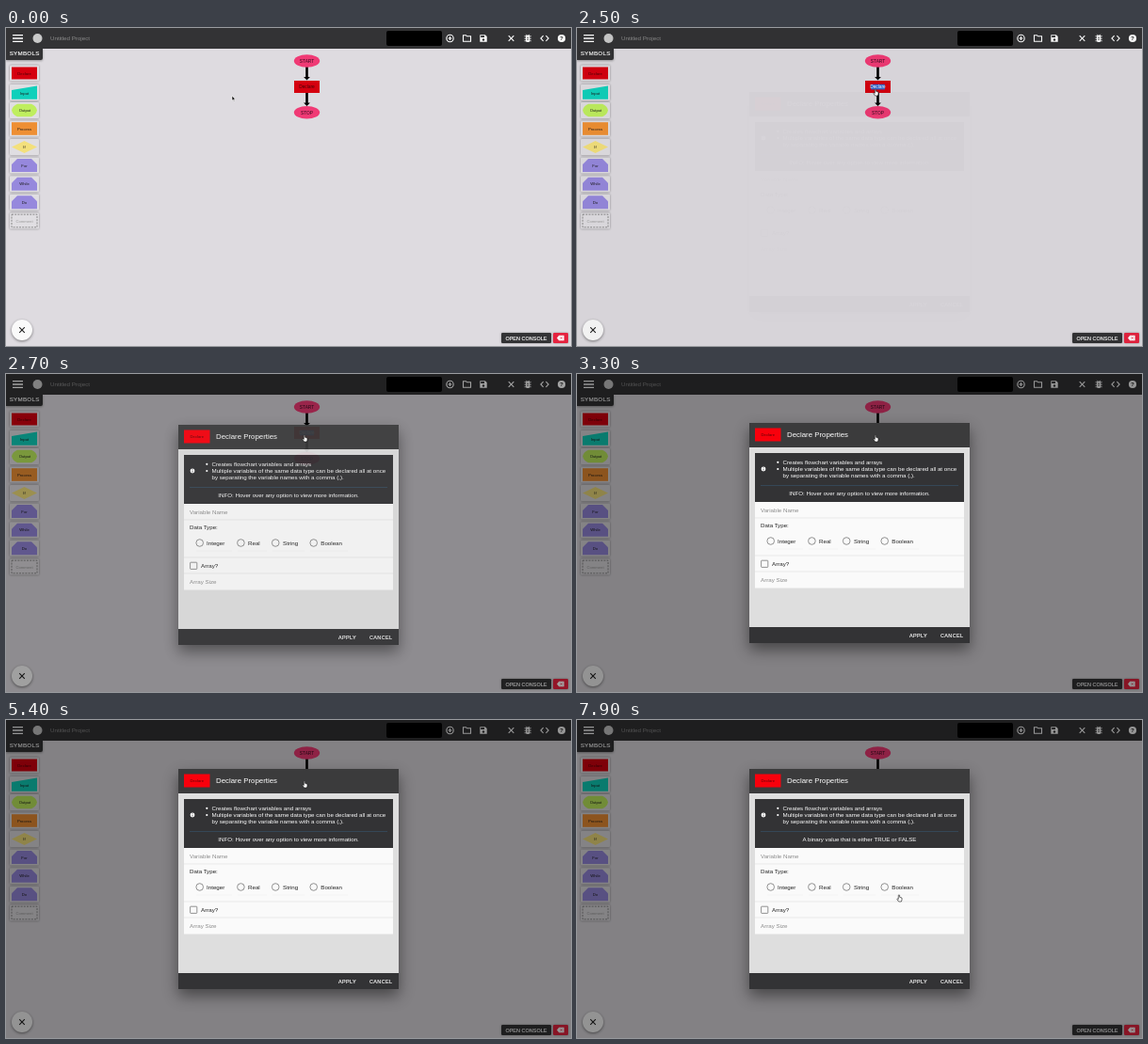
Animation of 600 by 338 pixels, one loop 8 s. Source, as an HTML page:

```html
<!DOCTYPE html>
<html lang="en">
<head>
<meta charset="utf-8">
<title>Flowchart editor</title>
<style>
  html, body { margin: 0; width: 100%; height: 100%; overflow: hidden; background: #dedbe0; }
  svg { display: block; width: 100vw; height: 100vh; }
  text { font: 6.2px "Liberation Sans", Arial, sans-serif; fill: #222; }
  .dark { fill: #333335; }
  .white, text.white { fill: #fff; }
  .muted, text.muted { fill: #8b8b8b; }
  .line { fill: none; stroke: #fff; stroke-width: 1.1; }
  .rule { fill: none; stroke: #dcdcdc; stroke-width: .6; }
  .control { fill: none; stroke: #777; stroke-width: .8; }
  .mid text { text-anchor: middle; }
  .small text { font-size: 4.2px; fill: #1c1c1c; }
  .node text { font-size: 4.8px; fill: #35091d; }
  text.button { font-size: 5.46px; letter-spacing: .39px; fill: #fff; stroke: #fff; stroke-width: .15px; }
  .tile { fill: #e0dee2; filter: drop-shadow(0 .8px .8px #0006); }
  .loop { fill: #9688dd; }

  .overlay, .dialog, .selection, .arrow, .hand, .hint, .boolHint, .cursor {
    animation: 8s step-end infinite;
  }
  .overlay { animation-name: dim; }
  .dialog { animation-name: open; }
  .selection { animation-name: select; }
  .cursor { animation-name: move; }
  .arrow { animation-name: arrow; }
  .hand { animation-name: hand; }
  .hint { animation-name: hint; }
  .boolHint { animation-name: boolHint; }

  @keyframes dim {
    0% { opacity: 0; }
    31% { opacity: .03; }
    32.25% { opacity: .14; }
    33.5% { opacity: .36; }
    34.75%, 100% { opacity: .41; }
  }
  @keyframes open {
    0% { opacity: 0; transform: translateY(16px); }
    31% { opacity: .02; transform: translateY(16px); }
    32.25% { opacity: .36; transform: translateY(11.5px); }
    33.5% { opacity: .92; transform: translateY(2px); }
    34.75%, 100% { opacity: 1; transform: none; }
  }
  @keyframes select { 0% { opacity: 0; } 30%, 100% { opacity: 1; } }
  @keyframes move {
    0% { transform: translate(240px, 72px); }
    2.5% { transform: translate(240px, 72px); animation-timing-function: steps(14); }
    20% { transform: translate(317px, 65px); }
    78.5% { transform: translate(317px, 65px); animation-timing-function: steps(3); }
    82.25% { transform: translate(314px, 65px); animation-timing-function: steps(10); }
    94.75%, 100% { transform: translate(342px, 186px); }
  }
  @keyframes arrow { 0% { opacity: 1; } 18.5% { opacity: 0; } 78.5% { opacity: 1; } 93.5%, 100% { opacity: 0; } }
  @keyframes hand { 0% { opacity: 0; } 18.5% { opacity: 1; } 78.5% { opacity: 0; } 93.5%, 100% { opacity: 1; } }
  @keyframes hint { 0% { opacity: 1; } 93.5%, 100% { opacity: 0; } }
  @keyframes boolHint { 0% { opacity: 0; } 93.5%, 100% { opacity: 1; } }
</style>
</head>
<body>
<svg viewBox="0 0 600 338">
  <defs>
    <rect id="tile" class="tile" x="4" y="-8.5" width="31" height="17" rx="1"/>
    <path id="loop" class="loop" d="M6 7V-1L12-7H27L33-1V7Z"/>
    <path id="down" d="M-1.3 0H1.3V11H3.4L0 14.5-3.4 11H-1.3Z"/>
    <path id="cross" d="M-2.8-2.8 2.8 2.8M2.8-2.8-2.8 2.8"/>
  </defs>

  <rect width="600" height="338" fill="#dedbe0"/>

  <!-- Flowchart -->
  <g class="mid node" transform="translate(319.5)">
    <use href="#down" y="41"/>
    <use href="#down" y="68.5"/>
    <ellipse cy="35" rx="13.7" ry="6.7" fill="#f03a75"/>
    <text y="36.8">START</text>
    <ellipse cy="89.7" rx="13.7" ry="6.7" fill="#f03a75"/>
    <text y="91.5">STOP</text>
    <rect x="-13.5" y="56" width="27" height="13" fill="#d5000f"/>
    <g class="small">
      <text y="64" style="fill:#4a0006">Declare</text>
      <g class="selection">
        <rect x="-7.4" y="59.8" width="14.8" height="5.6" fill="#3467cf"/>
        <text y="64" style="fill:#fff">Declare</text>
      </g>
    </g>
  </g>

  <!-- Symbol palette -->
  <g class="small mid">
    <g transform="translate(0 48)"><use href="#tile"/><path d="M6-6.5H33V6.5H6Z" fill="#d5000f"/><text x="19.5" y="1.5" style="fill:#4a0006">Declare</text></g>
    <g transform="translate(0 68.5)"><use href="#tile"/><path d="M6-2.5 33-7V7.3H6Z" fill="#10d0bb"/><text x="19.5" y="2.6">Input</text></g>
    <g transform="translate(0 87.5)"><use href="#tile"/><path d="M6 0Q7-4.5 12-6.7H27Q32-4.5 33 0 32 4.5 27 6.7H12Q7 4.5 6 0Z" fill="#bfee5e"/><text x="20" y="1.5">Output</text></g>
    <g transform="translate(0 107)"><use href="#tile"/><path d="M6-6.8H33V6.8H6Z" fill="#ee8f33"/><text x="19.5" y="1.5">Process</text></g>
    <g transform="translate(0 126.5)"><use href="#tile"/><path d="M6 0 19.5-6.5 33 0 19.5 6.5Z" fill="#f3e07c"/><text x="19.5" y="1.5">If</text></g>
    <g transform="translate(0 146)"><use href="#tile"/><use href="#loop"/><text x="19.5" y="1.5">For</text></g>
    <g transform="translate(0 165.7)"><use href="#tile"/><use href="#loop"/><text x="19.5" y="1.5">While</text></g>
    <g transform="translate(0 185.2)"><use href="#tile"/><use href="#loop"/><text x="19.5" y="1.5">Do</text></g>
    <g transform="translate(0 205)"><use href="#tile"/><path d="M6-6.8H33V6.8H6Z" fill="none" stroke="#777" stroke-width=".8" stroke-dasharray="2 1.2"/><text x="19.5" y="1.5" style="fill:#999">Comment</text></g>
  </g>

  <!-- Top bar -->
  <path class="dark" d="M0 22H39V32Q39 34 37 34H0Z" style="filter:drop-shadow(0 1px 1px #0005)"/>
  <rect class="dark" width="600" height="22"/>
  <text class="button" x="3.7" y="29.4" style="font-size:6.2px;letter-spacing:.28px">SYMBOLS</text>
  <path class="line" d="M7 7.6H18M7 11H18M7 14.4H18" style="stroke-width:1.3"/>
  <circle cx="33.5" cy="11" r="5" fill="#c9c9c9"/>
  <text class="muted" x="47" y="13.2">Untitled Project</text>
  <rect x="404" y="3" width="59" height="16" rx="2"/>
  <g class="line">
    <circle cx="471.5" cy="11" r="3.7"/>
    <path d="M469.5 11H473.5M471.5 9V13M485.5 7.7H488.5L489.5 8.8H493.5V14.3H485.5Z"/>
    <use href="#cross" x="536.5" y="11"/>
    <path d="M570.6 8.2 567.9 11 570.6 13.8M573.4 8.2 576.1 11 573.4 13.8"/>
    <path d="M550.5 8.7H557.7M550.5 11.2H557.7M550.5 13.7H557.7M552.2 6.8 553.2 8M556 6.8 555 8" style="stroke-width:.8"/>
  </g>
  <rect class="white" x="551.9" y="7.5" width="4.4" height="7.6" rx="2.2"/>
  <path d="M553.1 10.2H555.1M553.1 12.2H555.1" stroke="#333" stroke-width=".8"/>
  <path class="white" d="M503.3 7.2H508.8L510.7 9V14.8H503.3Z"/>
  <path class="dark" d="M504.2 8.1H508V10H504.2Z"/>
  <circle class="dark" cx="507" cy="12.5" r="1.2"/>
  <circle class="white" cx="590" cy="11" r="4.1"/>
  <text x="590" y="13.2" text-anchor="middle" style="font-weight:700">?</text>

  <!-- Bottom controls -->
  <circle cx="17" cy="321" r="11" fill="#fafafa" style="filter:drop-shadow(0 1px 1.5px #0007)"/>
  <use href="#cross" x="17" y="321" stroke="#222" stroke-width="1.1"/>
  <g style="filter:drop-shadow(0 .8px .8px #0005)">
    <rect class="dark" x="526" y="324" width="53" height="11" rx="1.2"/>
    <rect x="581" y="324" width="16" height="11" rx="1.2" fill="#e5233f"/>
  </g>
  <text class="button" x="530.4" y="331.5" style="letter-spacing:.04px">OPEN CONSOLE</text>
  <path class="white" d="M585 329.5 587.2 326.8H592.6V332.2H587.2Z"/>
  <use href="#cross" transform="translate(589.7 329.5) scale(.42)" stroke="#e5233f" stroke-width="1.7"/>

  <rect class="overlay" width="600" height="338"/>

  <!-- Properties dialog -->
  <g class="dialog">
    <rect x="183" y="52" width="234" height="234" fill="#dedede" style="filter:drop-shadow(0 7px 8px #0007)"/>
    <rect x="183" y="52" width="234" height="26" fill="#3b3b3c"/>
    <rect x="189" y="57.5" width="27.5" height="14" fill="#f9000c"/>
    <g class="mid small"><text x="202.8" y="66" style="fill:#5c0006">Declare</text></g>
    <text class="white" x="223" y="67" style="font-size:7.85px">Declare Properties</text>

    <rect class="dark" x="189" y="84" width="222" height="52"/>
    <circle class="white" cx="198" cy="101" r="2.4"/>
    <path d="M198 100.7V102.4M198 99.4V100" stroke="#333" stroke-width=".7"/>
    <circle class="white" cx="213.3" cy="93.8" r="1.1"/>
    <circle class="white" cx="213.3" cy="101" r="1.1"/>
    <text class="white" x="218.5" y="95.8">Creates flowchart variables and arrays</text>
    <text class="white" x="218.5" y="103">Multiple variables of the same data type can be declared all at once</text>
    <text class="white" x="218.5" y="110.2">by separating the variable names with a comma (,).</text>
    <path d="M195 118.5H405" stroke="#365470" stroke-width=".6"/>
    <g class="mid">
      <text class="white hint" x="300" y="129">INFO: Hover over any option to view more information.</text>
      <text class="white boolHint" x="300" y="129">A binary value that is either TRUE or FALSE</text>
    </g>

    <rect x="189" y="136" width="222" height="91.5" fill="#fafafa"/>
    <path class="rule" d="M189 153H411M189 193H411M189 210H411"/>
    <path class="rule" d="M202 186H240M246 186H277M283 186H317M323 186H363" style="stroke:#eee"/>
    <text class="muted" x="195" y="146.6">Variable Name</text>
    <text x="195" y="163">Data Type:</text>
    <g class="control">
      <circle cx="205.7" cy="177.5" r="3.8"/>
      <circle cx="249.4" cy="177.5" r="3.8"/>
      <circle cx="286.2" cy="177.5" r="3.8"/>
      <circle cx="326.7" cy="177.5" r="3.8"/>
      <rect x="195.6" y="198.2" width="7.2" height="7.2" rx=".6"/>
    </g>
    <text x="213" y="179.6">Integer</text>
    <text x="257" y="179.6">Real</text>
    <text x="294" y="179.6">String</text>
    <text x="334.3" y="179.6">Boolean</text>
    <text x="207" y="203.6">Array?</text>
    <text class="muted" x="195" y="221">Array Size</text>

    <rect class="dark" x="183" y="269" width="234" height="17"/>
    <text class="button" x="353" y="279.5">APPLY</text>
    <text class="button" x="386" y="279.5">CANCEL</text>
  </g>

  <g class="cursor" stroke-width=".6" stroke-linejoin="round">
    <path class="arrow" d="M0 0V5.2L1.2 4.1 2 6 2.9 5.6 2.1 3.8H3.7Z" fill="#111" stroke="#fff"/>
    <path class="hand" d="M-.7.2Q0-.5.6.2V2.3L3 3V5.2L2.4 7H-.4L-2.2 4.4-1.5 3.9-.7 4.6Z" fill="#fff" stroke="#111"/>
  </g>
</svg>
</body>
</html>
```
